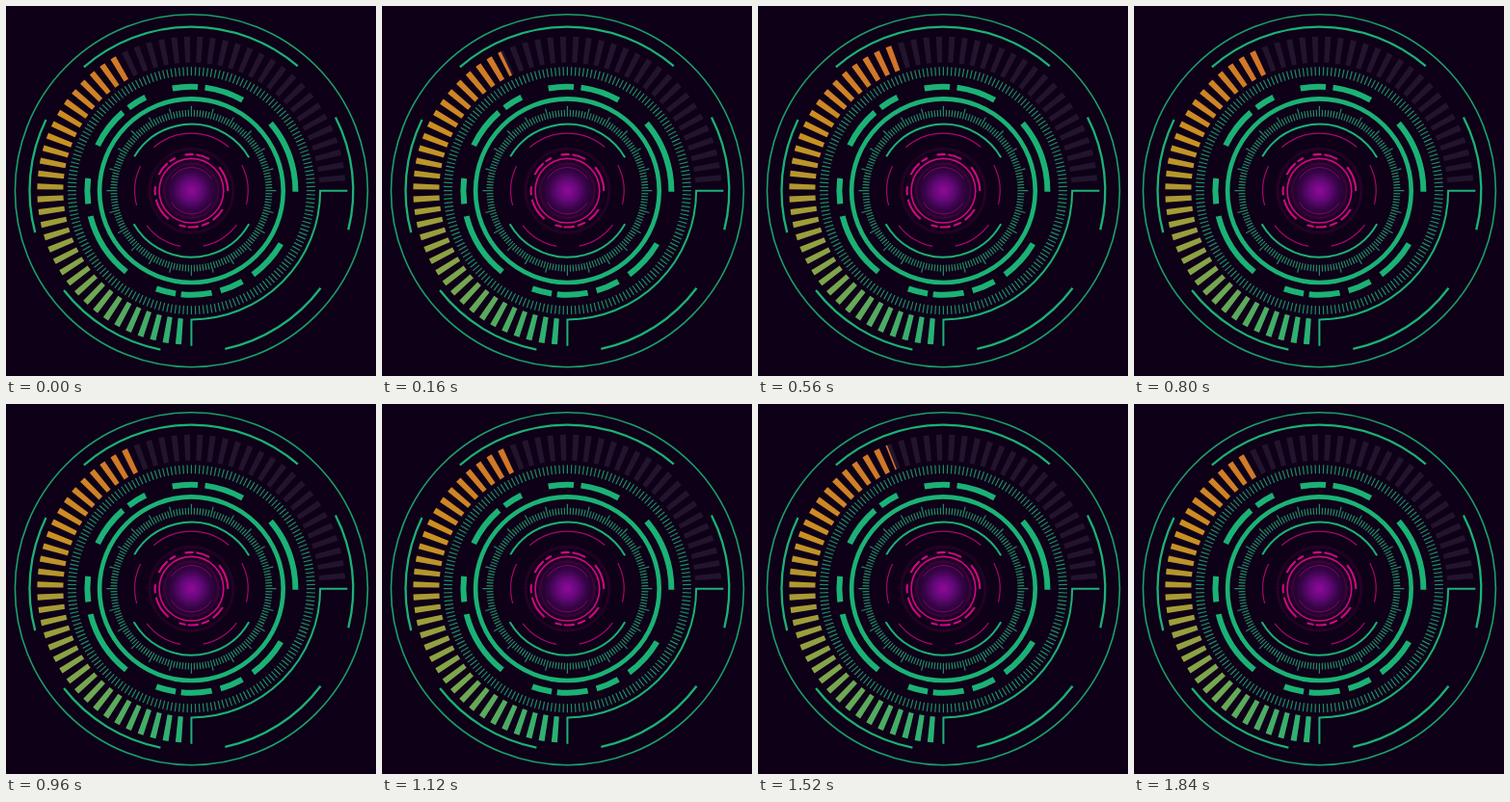
Recreate the animation shown at these times as an HTML page with a canvas. Size 384x384 px, loop 1.92 s.

```html
<!DOCTYPE html>
<html>
<head>
<meta charset="utf-8">
<style>
html, body { margin: 0; width: 100%; height: 100%; overflow: hidden; background: #0e0017; }
canvas { display: block; width: 384px; height: 384px; }
</style>
</head>
<body>
<canvas width="384" height="384"></canvas>
<script>
const ctx = document.querySelector('canvas').getContext('2d');
const LOOP = 1920, BARS = 55, STEP = 270 / (BARS + 1), HALF = 1.1;
const GREEN = '#1bb276';
const rad = deg => deg * Math.PI / 180;

// Dash and gap lengths of the broken ring, in degrees
const DASHES = [14, 4, 22, 20, 41, 30, 23, 7, 13, 5, 17, 3, 11, 19, 37, 7, 14, 19, 23, 4, 11, 16];

function stroke(width, color) {
  ctx.lineWidth = width;
  ctx.strokeStyle = color;
  ctx.stroke();
}

function arc(r, from, to, width, color) {
  ctx.beginPath();
  ctx.arc(0, 0, r, rad(from), rad(to));
  stroke(width, color);
}

function ticks(count, color, inner, outer) {
  ctx.beginPath();
  for (let i = 0; i < count; i++) {
    const a = rad(i * 360 / count), r = outer(i);
    ctx.moveTo(inner * Math.cos(a), inner * Math.sin(a));
    ctx.lineTo(r * Math.cos(a), r * Math.sin(a));
  }
  stroke(1.2, color);
}

function dial(main, thin, faint, weight) {
  arc(170, 229, 310.5, weight, thin);
  for (let i = 0; i < 4; i++) arc(167.9, i * 64 - 27, i * 64 + 14, weight, thin);
  ticks(188, faint, 119.5, () => 128.5);
  ctx.setLineDash(DASHES.map(d => rad(d) * 108));
  arc(108, -100.5, 259.5, 6, main);
  ctx.setLineDash([]);
  arc(95.3, 0, 360, 4.6, main);
  ticks(168, faint, 77, i => i % 7 ? 84 : 88);
  arc(69, 211, 330, 2, thin);
  arc(69, 30, 150, 2, thin);
}

function spread(gradient, colors, end) {
  colors.forEach((c, i) => gradient.addColorStop(end * i / (colors.length - 1), c));
  return gradient;
}

const heat = spread(ctx.createConicGradient(rad(90), 0, 0),
  ['#20b278', '#84a548', '#cc9020', '#d56c2a'], 170 / 360);
const glow = spread(ctx.createRadialGradient(0, 0, 0, 0, 0, 40),
  ['#8e0a98', '#66087a', '#360446', '#1c0226', '#0e0017'], 1);

// Two unequal swings per loop
function gaugeAngle(t) {
  const x = 2 * Math.PI * t / LOOP;
  return 157.3 - 2 * Math.cos(x) + 1.4 * Math.sin(x) - 3.7 * Math.cos(2 * x);
}

function gauge(limit) {
  for (let i = 1; i <= BARS; i++) {
    const from = i * STEP - HALF, to = i * STEP + HALF;
    arc(146.5, from + 90, to + 90, 27, '#23142e');
    if (limit > from) arc(146.5, from + 90, Math.min(to, limit) + 90, 27, heat);
  }
}

function bracket() {
  ctx.beginPath();
  ctx.moveTo(162, 0);
  ctx.arc(0, 0, 133.7, 0, rad(90));
  ctx.lineTo(0, 161);
  stroke(2, GREEN);
}

function frame(now) {
  ctx.setTransform(1, 0, 0, 1, 0, 0);
  ctx.fillStyle = '#0e0017';
  ctx.fillRect(0, 0, 384, 384);
  ctx.translate(192.4, 191.7);

  arc(183, 0, 360, 1.6, '#1aa06c');
  gauge(gaugeAngle(now));
  bracket();
  dial(GREEN, GREEN, '#1f8a66', 2.3);

  ctx.fillStyle = glow;
  ctx.beginPath();
  ctx.arc(0, 0, 40, 0, rad(360));
  ctx.fill();
  ctx.scale(0.35, 0.35);
  dial('#d00782', '#a30a6a', '#650850', 3.4);

  requestAnimationFrame(frame);
}
requestAnimationFrame(frame);
</script>
</body>
</html>
```
